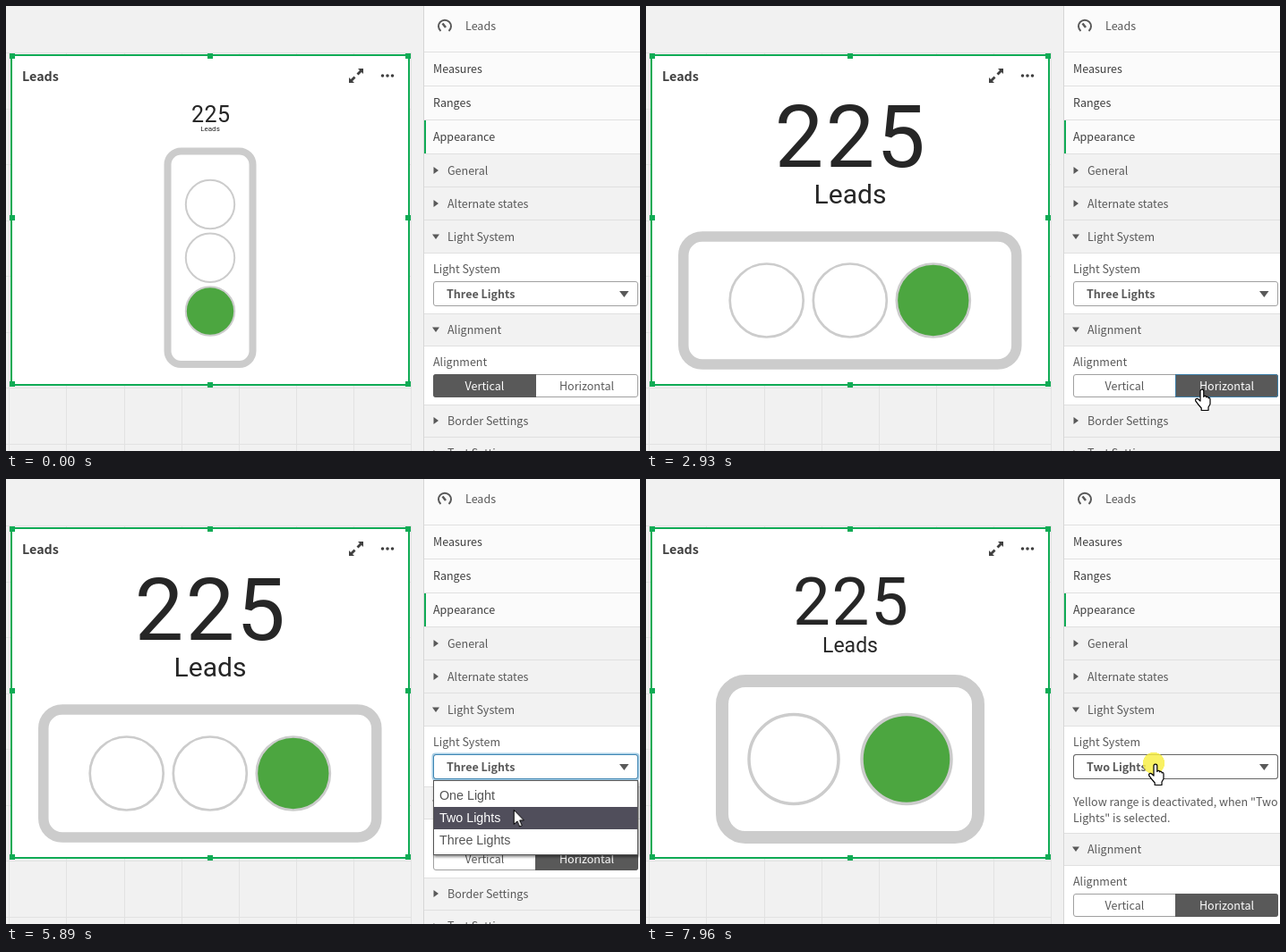
These frames come from a looping animation (708 by 498 pixels, 7990 ms). An HTML page:

```html
<!DOCTYPE html>
<html lang="en">
<head>
<meta charset="utf-8">
<title>Traffic light settings</title>
<style>
html,body{margin:0;width:100%;height:100%;overflow:hidden;background:#f1f1f1}
svg{display:block;width:708px;height:498px}
text{font:12.53px "Noto Sans CJK SC","Noto Sans CJK JP","Noto Sans",sans-serif;fill:#595959}
.dark{fill:#404040}
.b{font-weight:700}
.mid{text-anchor:middle}
.title{font-size:14.3px;font-weight:700;fill:#404040}
.widget text{font-family:Roboto,sans-serif;fill:#262626;text-anchor:middle}
.widget .num{font-stretch:80%}
.menu text{font:14.3px "Liberation Sans",Arial,sans-serif;fill:#555}
.menu .on text{fill:#fff}
.frame,.lamp{fill:none;stroke:#ccc}
.go{fill:#4ca640;stroke:#ccc}
.sep{stroke:#e0e0e0}
.ic{fill:#595959}
.field{fill:#fff;stroke:#a0a0a0}

/* on/off states */
.s{animation:7.99s step-end infinite}
.tall{animation-name:tall}
.wide{animation-name:wide}
.two{animation-name:two}
.below{animation-name:below}
.three-txt{animation-name:threeTxt}
.two-txt{animation-name:twoTxt}
.vert{animation-name:vert}
.horiz{animation-name:horiz}
.btn-hover{animation-name:btnHover}
.btn-focus{animation-name:btnFocus}
.sel-hover{animation-name:selHover}
.sel-focus{animation-name:selFocus}
.menu{animation-name:menu}
.hi1{animation-name:hi1}
.hi2{animation-name:hi2}
.hi3{animation-name:hi3}
.arrow{animation-name:arrow}
.hand{animation-name:hand}
@keyframes tall{36.67%{opacity:0}}
@keyframes wide{0%{opacity:0}36.67%{opacity:1}78.6%{opacity:0}}
@keyframes two{0%{opacity:0}78.6%{opacity:1}}
@keyframes below{0%{transform:none}78.6%{transform:translateY(52px)}}
@keyframes threeTxt{75.8%{opacity:0}}
@keyframes twoTxt{0%{opacity:0}75.8%{opacity:1}}
@keyframes vert{35%{opacity:0}}
@keyframes horiz{0%{opacity:0}35%{opacity:1}}
@keyframes btnHover{0%{opacity:0}19.5%{opacity:1}35%{opacity:0}}
@keyframes btnFocus{0%{opacity:0}35%{opacity:1}67.6%{opacity:0}}
@keyframes selHover{0%{opacity:0}88.4%{opacity:1}}
@keyframes selFocus{0%{opacity:0}67.6%{opacity:1}78.6%{opacity:0}}
@keyframes menu{0%{opacity:0}67.6%{opacity:1}75.8%{opacity:0}}
@keyframes hi1{0%{opacity:0}71.9%{opacity:1}73.3%{opacity:0}}
@keyframes hi2{0%{opacity:0}73.3%{opacity:1}}
@keyframes hi3{71.9%{opacity:0}}
@keyframes arrow{0%{opacity:0}13.89%{opacity:1}19.5%{opacity:0}61.8%{opacity:1}65.6%{opacity:0}71.6%{opacity:1}88.4%{opacity:0}}
@keyframes hand{0%{opacity:0}19.5%{opacity:1}61.8%{opacity:0}65.6%{opacity:1}71.6%{opacity:0}88.4%{opacity:1}}

/* pointer path */
.pointer{animation:path 7.99s infinite}
@keyframes path{
0%,13.89%{transform:translate(597px,497px);animation-timing-function:cubic-bezier(.3,.3,.5,1)}
20.78%{transform:translate(612px,433px);animation-timing-function:ease-in-out}
23.28%{transform:translate(620px,428px);animation-timing-function:step-end}
25.78%{transform:translate(621px,428px);animation-timing-function:step-end}
60.33%{transform:translate(620px,428px);animation-timing-function:ease-in-out}
66.7%,70.46%{transform:translate(588px,320px);animation-timing-function:ease-in-out}
75.1%,85.73%{transform:translate(562px,381px);animation-timing-function:ease-in-out}
90.74%,100%{transform:translate(569px,318px)}
}

/* click ripple */
.ripple{fill:#f8ee3c;animation:ripple 7.99s infinite}
@keyframes ripple{
0%,32.53%{transform:translate(621px,428px) scale(.29);opacity:0;animation-timing-function:step-end}
32.54%{transform:translate(621px,428px) scale(.29);opacity:.8;animation-timing-function:linear}
36.66%{transform:translate(621px,428px) scale(1);opacity:0;animation-timing-function:step-end}
99.62%,100%{transform:translate(567px,318px) scale(.29);opacity:.8}
}
</style>
</head>
<body>
<svg viewBox="0 0 708 498">
<defs>
  <path id="right" class="ic" d="M477.5 180v8l5.5-4z"/>
  <path id="down" class="ic" d="M476 255.5h8l-4 5.5z"/>
  <filter id="shade" x="-5%" y="-5%" width="110%" height="120%">
    <feDropShadow dx="1" dy="2" stdDeviation="1.5" flood-opacity=".45"/>
  </filter>
</defs>

<!-- sheet grid -->
<path d="M3.5 52V498M67.5 52V498M132.5 52V498M196.5 52V498M260.5 52V498M324.5 52V498M388.5 52V498M452.5 52V498
  M0 52.5H453M0 115.5H453M0 177.5H453M0 240.5H453M0 302.5H453M0 365.5H453M0 427.5H453M0 490.5H453" stroke="#e2e2e2" fill="none"/>

<!-- selected widget -->
<rect x="6" y="55" width="444" height="369" fill="#fff" stroke="#10ab55" stroke-width="2"/>
<path d="M4 53h6v6h-6zM225 53h6v6h-6zM446 53h6v6h-6zM4 234h6v6h-6zM446 234h6v6h-6zM4 420h6v6h-6zM225 421h6v6h-6zM446 420h6v6h-6z" fill="#10ab55"/>
<text class="title" x="18" y="84">Leads</text>
<g fill="#404040">
  <path d="M393 70h6v6l-2-2-3.500 3.500-2-2 3.500-3.500zM389 86h-6v-6l2 2 3.500-3.500 2 2-3.500 3.500z"/>
  <circle cx="420.500" cy="78" r="1.800"/><circle cx="426" cy="78" r="1.800"/><circle cx="431.500" cy="78" r="1.800"/>
</g>

<g class="widget">
  <g class="s tall">
    <text class="num" x="214 228.500 243" y="130" style="font-size:25px">225</text>
    <text x="228" y="140" style="font-size:8px">Leads</text>
    <rect class="frame" x="180.500" y="162.500" width="95" height="238.500" rx="15" stroke-width="8"/>
    <g stroke-width="2">
      <circle class="lamp" cx="228" cy="222" r="27.200"/>
      <circle class="lamp" cx="228" cy="281.800" r="27.200"/>
      <circle class="go" cx="228" cy="341.500" r="27.200"/>
    </g>
  </g>
  <g class="s wide">
    <text class="num" x="171 228 284.500" y="180" style="font-size:97px">225</text>
    <text x="228" y="221" style="font-size:30px">Leads</text>
    <rect class="frame" x="41.800" y="258" width="372" height="143" rx="21" stroke-width="11.500"/>
    <g stroke-width="2.700">
      <circle class="lamp" cx="134.700" cy="329.500" r="41"/>
      <circle class="lamp" cx="227.800" cy="329.500" r="41"/>
      <circle class="go" cx="320.800" cy="329.500" r="41"/>
    </g>
  </g>
  <g class="s two">
    <text class="num" x="185 228.500 272" y="162.500" style="font-size:74.500px">225</text>
    <text x="228" y="194" style="font-size:23px">Leads</text>
    <rect class="frame" x="85" y="226" width="286" height="175" rx="26" stroke-width="14"/>
    <g stroke-width="3.500">
      <circle class="lamp" cx="165" cy="313.500" r="50"/>
      <circle class="go" cx="291" cy="313.500" r="50"/>
    </g>
  </g>
</g>

<!-- properties panel -->
<rect x="466" width="242" height="498" fill="#fbfbfb"/>
<path d="M466.500 0V498" stroke="#d6d6d6"/>
<rect x="467" y="166" width="241" height="110" fill="#f2f2f2"/>
<path class="sep" d="M467 51.500H708M467 89.500H708M467 127.500H708M467 165.500H708M467 202.500H708M467 239.500H708M467 276.500H708"/>
<rect x="467" y="128" width="2" height="37" fill="#10ab55"/>
<g fill="none" stroke="#595959" stroke-width="2">
  <path d="M485.500 28A7 7 0 1 1 494.500 28"/>
  <path d="M487.500 19.500L491 24" stroke-width="2.500"/>
</g>
<text x="513" y="27">Leads</text>
<text class="dark" x="477" y="75">Measures</text>
<text class="dark" x="477" y="113">Ranges</text>
<text class="dark" x="477" y="151">Appearance</text>
<use href="#right"/><text x="493" y="189">General</text>
<use href="#right" y="37"/><text x="493" y="226">Alternate states</text>
<use href="#down"/><text x="493" y="263">Light System</text>
<rect x="467" y="277" width="241" height="221" fill="#fff"/>
<text x="477" y="299">Light System</text>

<g class="s two">
  <text x="477" y="366">Yellow range is deactivated, when "Two</text>
  <text x="477" y="384">Lights" is selected.</text>
</g>

<g class="s below">
  <rect x="467" y="344" width="241" height="37" fill="#f2f2f2"/>
  <rect x="467" y="446" width="241" height="74" fill="#f2f2f2"/>
  <path class="sep" d="M467 344.500H708M467 380.500H708M467 446.500H708M467 482.500H708"/>
  <use href="#down" y="104"/><text x="493" y="367">Alignment</text>
  <text x="477" y="403">Alignment</text>
  <rect class="field" x="477.500" y="412.500" width="228" height="25" rx="2.500"/>
  <path d="M591.500 412.500V437.500" stroke="#a0a0a0"/>
  <g class="b mid">
    <text x="534.500" y="430">Vertical</text>
    <text x="648.500" y="430">Horizontal</text>
  </g>
  <path class="s btn-hover" d="M591.500 412.500H703q2.500 0 2.500 2.500V435q0 2.500-2.500 2.500H591.500z" fill="none" stroke="#666"/>
  <g class="s vert b mid">
    <path d="M592 412H480q-3 0-3 3V435q0 3 3 3H592z" fill="#595959"/>
    <text x="534.500" y="430" style="fill:#fff">Vertical</text>
  </g>
  <g class="s horiz b mid">
    <path d="M591 412H703q3 0 3 3V435q0 3-3 3H591z" fill="#595959"/>
    <text x="648.500" y="430" style="fill:#fff">Horizontal</text>
  </g>
  <path class="s btn-focus" d="M591.500 412.500H703q2.500 0 2.500 2.500V435q0 2.500-2.500 2.500H591.500z" fill="none" stroke="#3d7fa8"/>
  <use href="#right" y="280"/><text x="493" y="469">Border Settings</text>
  <use href="#right" y="317"/><text x="493" y="505">Text Settings</text>
</g>

<!-- drop-down -->
<rect class="field" x="477.500" y="308.500" width="228" height="27" rx="2.500"/>
<rect class="s sel-hover" x="477.500" y="308.500" width="228" height="27" rx="2.500" fill="none" stroke="#666"/>
<g class="s sel-focus" fill="none">
  <rect x="476.500" y="307.500" width="230" height="29" rx="3" stroke="#a9cfe6" stroke-width="2"/>
  <rect x="477.500" y="308.500" width="228" height="27" rx="2.500" stroke="#3f86b3"/>
</g>
<path class="ic" d="M685 319h10.500l-5.200 7z"/>
<text class="b s three-txt" x="492" y="327">Three Lights</text>
<text class="b s two-txt" x="492" y="327">Two Lights</text>

<g class="s menu">
  <rect x="477.500" y="337.500" width="228" height="83" fill="#fff" stroke="#555" filter="url(#shade)"/>
  <text x="484" y="359">One Light</text>
  <text x="484" y="384">Two Lights</text>
  <text x="484" y="409">Three Lights</text>
  <g class="on" fill="#504e5b">
    <g class="s hi1"><rect x="478" y="342" width="227" height="25"/><text x="484" y="359">One Light</text></g>
    <g class="s hi2"><rect x="478" y="367" width="227" height="25"/><text x="484" y="384">Two Lights</text></g>
    <g class="s hi3"><rect x="478" y="392" width="227" height="25"/><text x="484" y="409">Three Lights</text></g>
  </g>
</g>

<circle class="ripple" r="42"/>
<g class="pointer" fill="#fff" stroke="#000" stroke-linejoin="round">
  <path class="s arrow" d="M.5 .5V16.500l3.700-3.500 2.600 6 2.600-1.100-2.600-5.900H11.500z"/>
  <path class="s hand" stroke-width="1.200" d="M-2 14V3a1.900 1.900 0 0 1 3.800 0V9.500C2 8 4.500 8 4.800 10C5 8.700 7 9 7.200 11C7.500 10 9 10.300 9 12V17.500L7 21V24.500H-.8V22C-3 19.500-5.500 16.500-7.300 13.800C-8 11.500-5.500 10.800-4 12.200z"/>
</g>
</svg>
</body>
</html>
```
